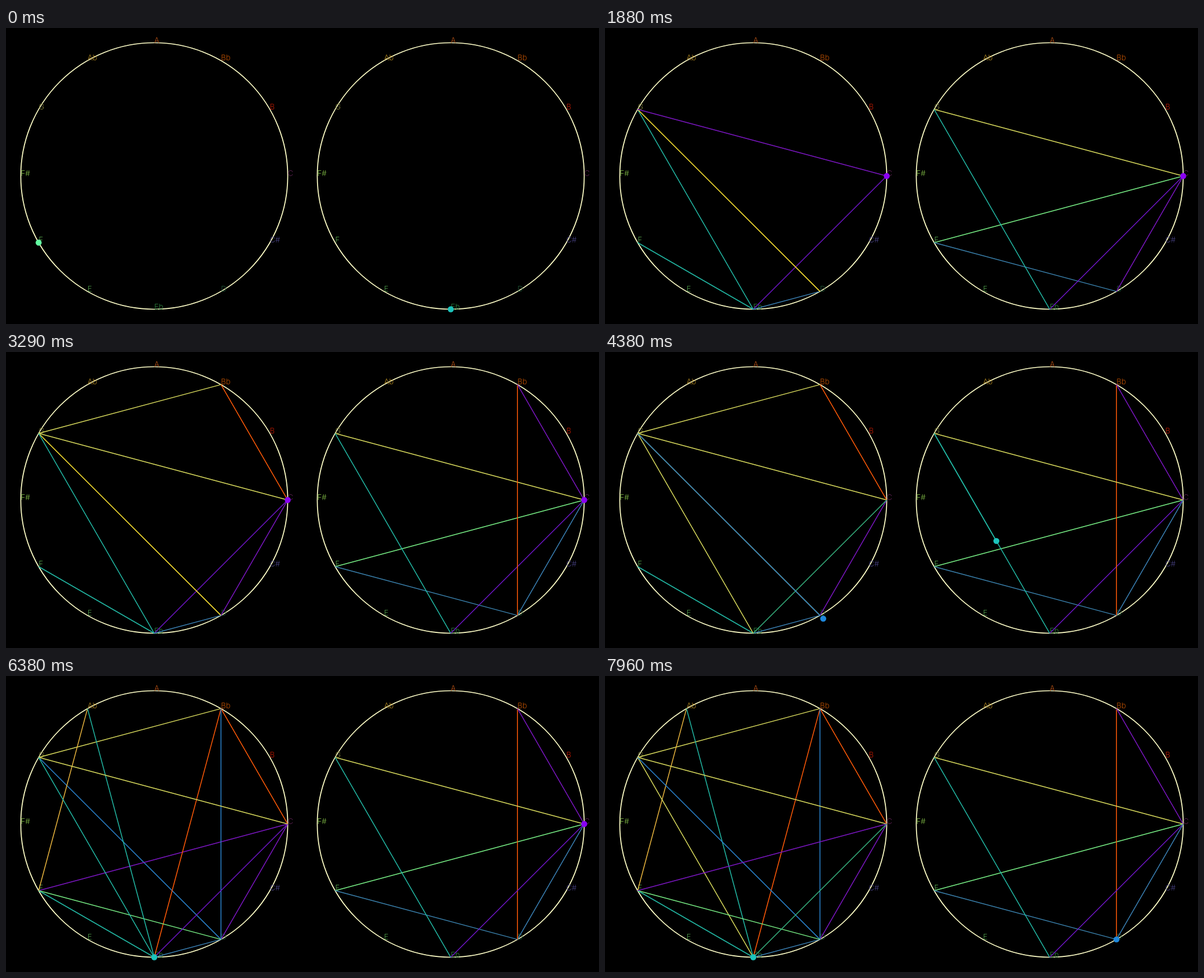
Recreate the animation shown at these times as an HTML page with a canvas. Size 1024x512 px, loop 8000 ms.

```html
<!DOCTYPE html>
<html lang="en">
<head>
<meta charset="utf-8">
<title>Note circles</title>
<style>
html, body { margin: 0; width: 100%; height: 100%; overflow: hidden; background: #000; }
canvas { display: block; }
</style>
</head>
<body>
<canvas id="stage" width="1024" height="512"></canvas>
<script>
const ctx = document.getElementById('stage').getContext('2d');
const LOOP = 8000, FPS = 24, RADIUS = 230.5;

// Clockwise from the right: name, label colour, line colour, dot colour
const notes = [
  ['C', '#5a2050', '#7a16c0', '#8a00f4'],
  ['C#', '#484284'],
  ['D', '#205a38', '#2a82cc', '#1e88dc'],
  ['Eb', '#2e823e', '#22b8a4', '#1cc4bc'],
  ['E', '#4b9646'],
  ['F', '#56a54c', '#76ec84', '#62fca2'],
  ['F#', '#82be46'],
  ['G', '#82823c', '#d6d85c', '#e6e050'],
  ['Ab', '#aa821e', '#e8b43e', '#f4bc40'],
  ['A', '#b45014'],
  ['Bb', '#be5000', '#ff5a08', '#ff5200'],
  ['B', '#b91900']
].map(([name, label, line, dot], i) => ({
  name, label, line, dot,
  x: 256 + RADIUS * Math.cos(i * Math.PI / 6),
  y: 256 + RADIUS * Math.sin(i * Math.PI / 6)
}));
const byName = Object.fromEntries(notes.map(n => [n.name, n]));

const shades = {
  'C>Eb': '#38b884', 'D>G': '#ffe634', 'Eb>D': '#3a80b4',
  'F>D': '#3a80ac', 'C>D': '#3a80b4', 'Eb>C': '#7016cc'
};

// Each step is a note and the beat at which it is reached
const parse = s => s.split(' ').map(p => {
  const [name, at] = p.split(':');
  return { name, at: +at, note: byName[name] };
});
const left = parse('F:0 Eb:6 C:12.5 G:18.5 Eb:25 D:33 G:41 C:45 ' +
  'Bb:50 G:55 C:60 G:65 Eb:70 D:74.5 C:78.5 ' +
  'Eb:89 G:101.5 D:106 F:110 C:114 Eb:118 Bb:122 D:125 ' +
  'F:131 Ab:138 Eb:142.5 C:146 G:149.5 Eb:152.5 ' +
  'C:160 Eb:165 G:170 D:175 F:181 C:186 Eb:190.5');
const right = parse('Eb:0 C:6.5 F:13 D:19.5 C:26 G:35 Eb:40.5 C:45 ' +
  'D:56 Bb:67 C:78 G:101.5 Eb:109 C:114 D:119 Bb:124.5 ' +
  'C:134 G:140 Eb:146 C:152.5 G:165 Eb:173 C:182 D:190.5');

// Ease out with a slight overshoot
const ease = p => 1 + 1.75 * (p - 1) ** 3 + 0.75 * (p - 1) ** 2;

function drawLine(a, b, part, color) {
  ctx.strokeStyle = color;
  ctx.lineWidth = 1.5;
  ctx.beginPath();
  ctx.moveTo(a.x, a.y);
  ctx.lineTo(a.x + (b.x - a.x) * part, a.y + (b.y - a.y) * part);
  ctx.stroke();
}

function drawDial() {
  ctx.strokeStyle = '#ffffc8';
  ctx.lineWidth = 1.7;
  ctx.beginPath();
  ctx.arc(256, 256, RADIUS, 0, 2 * Math.PI);
  ctx.stroke();
  ctx.font = '300 13px Inter, sans-serif';
  ctx.textBaseline = 'alphabetic';
  for (const n of notes) {
    ctx.fillStyle = n.label;
    ctx.fillText(n.name, n.x, n.y);
  }
}

function drawPanel(offset, steps, beat) {
  ctx.save();
  ctx.translate(offset, 0);
  drawDial();

  const lines = new Map();
  let dot = { x: steps[0].note.x, y: steps[0].note.y, color: steps[0].note.dot };
  for (let i = 1; i < steps.length; i++) {
    const from = steps[i - 1], to = steps[i];
    const glide = Math.min((to.at - from.at) * 0.65, 6);
    const p = Math.min(1, (beat - to.at + glide) / glide);
    if (p <= 0) break;
    const a = from.note, b = to.note, e = ease(p);
    const color = shades[from.name + '>' + to.name] || b.line;
    const key = [from.name, to.name].sort().join();
    if (p === 1) {
      lines.delete(key);
      lines.set(key, [a, b, 1, color]);
    } else {
      lines.set('moving', [a, b, Math.min(1, e), color]);
    }
    dot = { x: a.x + (b.x - a.x) * e, y: a.y + (b.y - a.y) * e, color: b.dot };
  }
  for (const l of lines.values()) drawLine(...l);

  ctx.fillStyle = dot.color;
  ctx.beginPath();
  ctx.arc(dot.x, dot.y, 5.2, 0, 2 * Math.PI);
  ctx.fill();
  ctx.restore();
}

function draw(now) {
  const beat = Math.min(191, Math.floor((now % LOOP + 5) * FPS / 1000));
  ctx.fillStyle = '#000';
  ctx.fillRect(0, 0, 1024, 512);
  drawPanel(0, left, beat);
  drawPanel(512, right, beat);
}

const start = performance.now();
function tick() {
  draw(performance.now() - start);
  requestAnimationFrame(tick);
}
tick();
</script>
</body>
</html>
```
